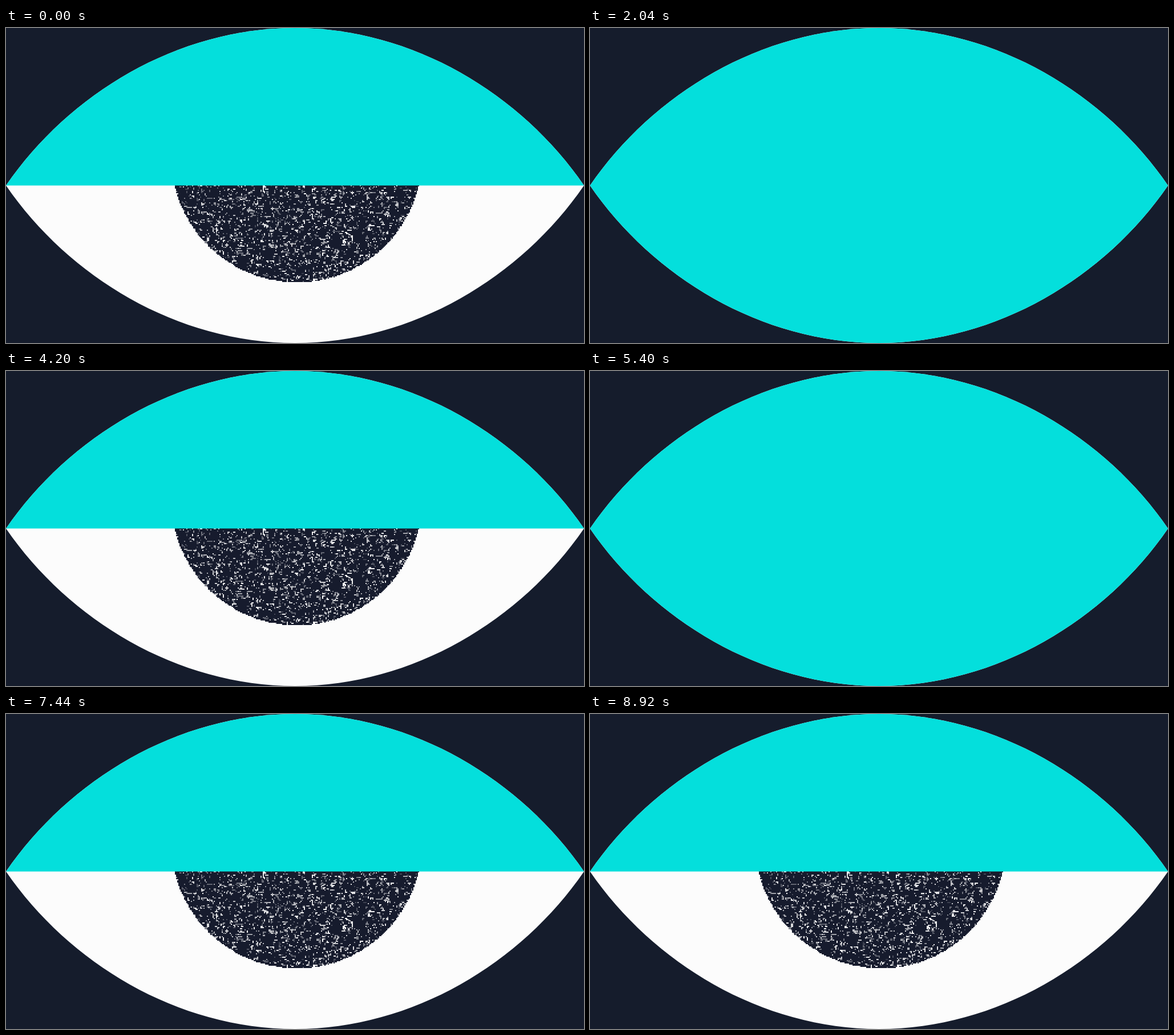
Animation, 1013 px wide and 553 px high, one loop 10000 ms. Source, as an HTML page with a canvas:

```html
<!DOCTYPE html>
<html lang="en">
<head>
<meta charset="utf-8">
<title>Blinking eye</title>
<style>
  html, body { margin: 0; width: 100%; height: 100%; overflow: hidden; background: #151c2c; }
  canvas { display: block; }
</style>
</head>
<body>
<canvas id="eye" width="1013" height="553"></canvas>
<script>
const W = 1013, H = 553, MID = H / 2, LOOP = 10000, BLINK = 360;
const BLINKS = [2040, 5400, 8560];
const NAVY = '#151c2c', TEAL = '#04dfdc', WHITE = '#fcfcfc';
const ctx = document.getElementById('eye').getContext('2d');

function fill(color, x, y, w, h) {
  ctx.fillStyle = color;
  ctx.fillRect(x, y, w, h);
}

function seeded(seed) {
  return () => {
    seed = (seed + 0x6d2b79f5) | 0;
    let t = Math.imul(seed ^ (seed >>> 15), 1 | seed);
    t = (t + Math.imul(t ^ (t >>> 7), 61 | t)) ^ t;
    return ((t ^ (t >>> 14)) >>> 0) / 4294967296;
  };
}

// Grainy disc: mostly navy, with grey and white specks that clump
// because a cell sometimes repeats its left or upper neighbour.
function drawIris() {
  const cx = 509.5, cy = 227, radius = 219.5, cell = 2;
  const random = seeded(7);
  const row = [];
  for (let y = 276; y < cy + radius; y += cell) {
    for (let i = 0; i * cell < 2 * radius; i++) {
      const x = Math.floor(cx - radius) + i * cell;
      const pick = random();
      if (pick < 0.25) row[i] = row[i - 1] || 0;
      else if (pick > 0.4) row[i] = random() < 0.8 ? 0 : 0.15 + 0.85 * random();
      const light = row[i] || 0;
      const edge = radius + random() - 0.5;
      if (Math.hypot(x + 1 - cx, y + 1 - cy) > edge) continue;
      const mix = (dark) => Math.round(dark + (252 - dark) * light);
      fill(`rgb(${mix(22)},${mix(27)},${mix(45)})`, x, y, cell, cell);
    }
  }
}

function eyePath() {
  ctx.beginPath();
  ctx.moveTo(0, MID);
  ctx.bezierCurveTo(110, 116, 300, 0, W / 2, 0);
  ctx.bezierCurveTo(W - 300, 0, W - 110, 116, W, MID);
  ctx.bezierCurveTo(W - 110, H - 116, W - 300, H, W / 2, H);
  ctx.bezierCurveTo(300, H, 110, H - 116, 0, MID);
}

function draw(closed) {
  fill(NAVY, 0, 0, W, H);
  ctx.save();
  eyePath();
  ctx.clip();
  fill(WHITE, 0, 0, W, H);
  if (!closed) drawIris();
  fill(TEAL, 0, 0, W, closed ? H : MID);
  ctx.restore();
}

let shown = null;
function tick() {
  const t = performance.now() % LOOP;
  const closed = BLINKS.some((start) => t >= start && t < start + BLINK);
  if (closed !== shown) draw(shown = closed);
  requestAnimationFrame(tick);
}
tick();
</script>
</body>
</html>
```
